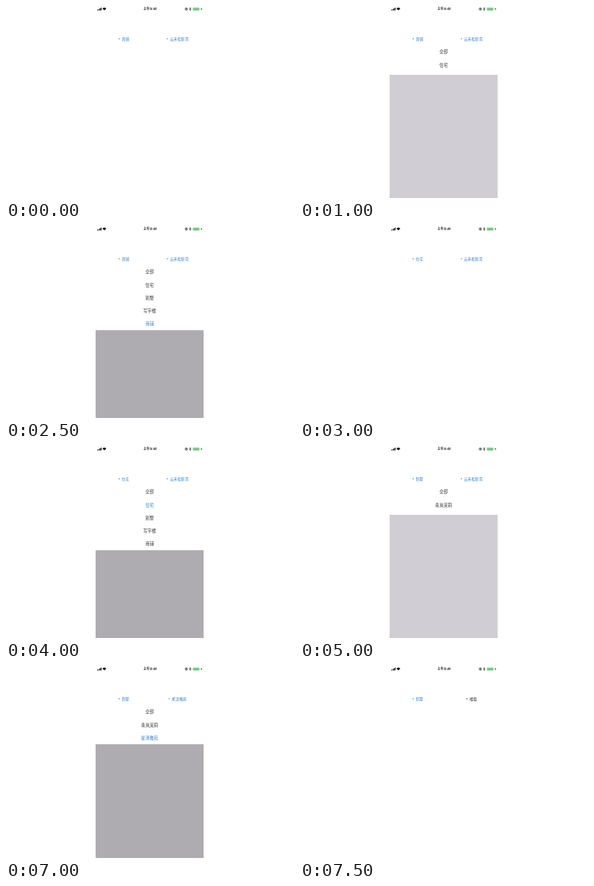
An HTML page for the animation above (8 s loop, 360 px wide and 240 px high).

```html
<!DOCTYPE html>
<html lang="zh-CN">
<head>
<meta charset="utf-8">
<title>下拉菜单</title>
<style>
  html, body { margin: 0; width: 100%; height: 100%; overflow: hidden; background: #fff; }
  svg { display: block; width: 360px; height: 240px; }
  text { font-family: "Noto Sans CJK SC", "Noto Sans CJK", "Noto Sans", sans-serif; }
  .title { font-size: 4.6px; }
  .row { font-size: 5.35px; text-anchor: middle; }
  .clock { font: 700 4.1px Inter, "Noto Sans CJK SC", "Noto Sans CJK", sans-serif; text-anchor: middle; }
</style>
</head>
<body>
<svg viewBox="0 0 360 240">
  <g fill="#111">
    <path d="M114 4.4h1.1v1h-1.1zM115.5 3.7h1.1v1.7h-1.1zM117 2.9h1.1v2.5h-1.1zM118.5 2.1h1.1v3.3h-1.1z"/>
    <path d="M120.6 3.2Q123 1 125.4 3.2L123 5.6z"/>
    <text class="clock" x="180" y="5.4">上午9:41</text>
    <path d="M243.4 4.1l1.1-1.6v1.1h.7l-1.1 1.6v-1.1z"/>
  </g>
  <g fill="none" stroke="#111">
    <circle cx="225.4" cy="3.8" r="1.4" stroke-width=".7"/>
    <path d="M225 3.8h.9" stroke-width="1"/>
    <path d="M229.2 2.9l2 1.8-1 1v-3.9l1 1-2 1.9" stroke-width=".5"/>
    <rect x="233.6" y="2" width="8" height="3.6" rx=".9" stroke="#8c9a8e" stroke-width=".4"/>
  </g>
  <rect x="234" y="2.4" width="7.2" height="2.8" rx=".6" fill="#4cd964"/>
  <path d="M242 3.2v1.2" stroke="#8c9a8e" stroke-width=".5"/>
  <g id="left"></g>
  <g id="right"></g>
  <rect id="shade" x="112" width="135"/>
  <g id="list"></g>
</svg>
<script>
const BLUE = '#2f7fe0', INK = '#333';
const DARK = '#aeacb0', LIGHT = '#d0ced4', PALE = '#fcfafe';
const LOOP = 8000, TOP = 49, PITCH = 16.25;
const BAY = '云禾松影湾', COURT = '星泽雅苑', UNSET = '楼盘';
const kinds = ['全部', '住宅', '别墅', '写字楼', '商铺'];
const estates = ['全部', '青岚茉莉', COURT];

const closed = {};
const open = items => ({ items, rows: items.length, top: TOP + items.length * PITCH, color: DARK });
const opening = items => ({ items, rows: 2, top: 86, color: LIGHT });
const fading = rows => ({ items: estates, rows, top: 66, bottom: 97.5, color: PALE });

// start time, left title, right title, menu
const steps = [
  [0, '商铺', BAY, closed],
  [1000, '商铺', BAY, opening(kinds)],
  [1500, '商铺', BAY, open(kinds)],
  [2000, '商铺', BAY, closed],
  [2500, '商铺', BAY, open(kinds)],
  [3000, '住宅', BAY, closed],
  [4000, '住宅', BAY, open(kinds)],
  [4500, '别墅', BAY, closed],
  [5000, '别墅', BAY, opening(estates)],
  [5500, '别墅', BAY, open(estates)],
  [6000, '别墅', COURT, fading(1)],
  [6500, '别墅', COURT, fading(0)],
  [7000, '别墅', COURT, open(estates)],
  [7500, '别墅', UNSET, closed]
];

const $ = id => document.getElementById(id);

function title(id, center, label) {
  const color = label === UNSET ? INK : BLUE;
  const x = center - (label.length * 4.6 + 4.2) / 2;
  $(id).innerHTML =
    `<path d="M${x} 40.4h2l-1 1.5z" fill="${color}"/>` +
    `<text class="title" x="${x + 4.2}" y="42.75" fill="${color}">${label}</text>`;
}

function menu({ items = [], rows = 0, top = 240, bottom = 240, color = 'none' }, chosen) {
  const shade = $('shade');
  shade.setAttribute('y', top);
  shade.setAttribute('height', bottom - top);
  shade.setAttribute('fill', color);
  $('list').innerHTML = items.slice(0, rows).map((label, i) =>
    `<text class="row" x="179.5" y="${59.4 + i * PITCH}" fill="${chosen.includes(label) ? BLUE : INK}">${label}</text>`
  ).join('');
}

let shown;
const start = performance.now();

function draw() {
  const t = (performance.now() - start) % LOOP;
  const step = steps.findLast(s => s[0] <= t);
  if (step !== shown) {
    shown = step;
    const [, left, right, panel] = step;
    title('left', 147.2, left);
    title('right', 214.4, right);
    menu(panel, [left, right]);
  }
  requestAnimationFrame(draw);
}
draw();
</script>
</body>
</html>
```
